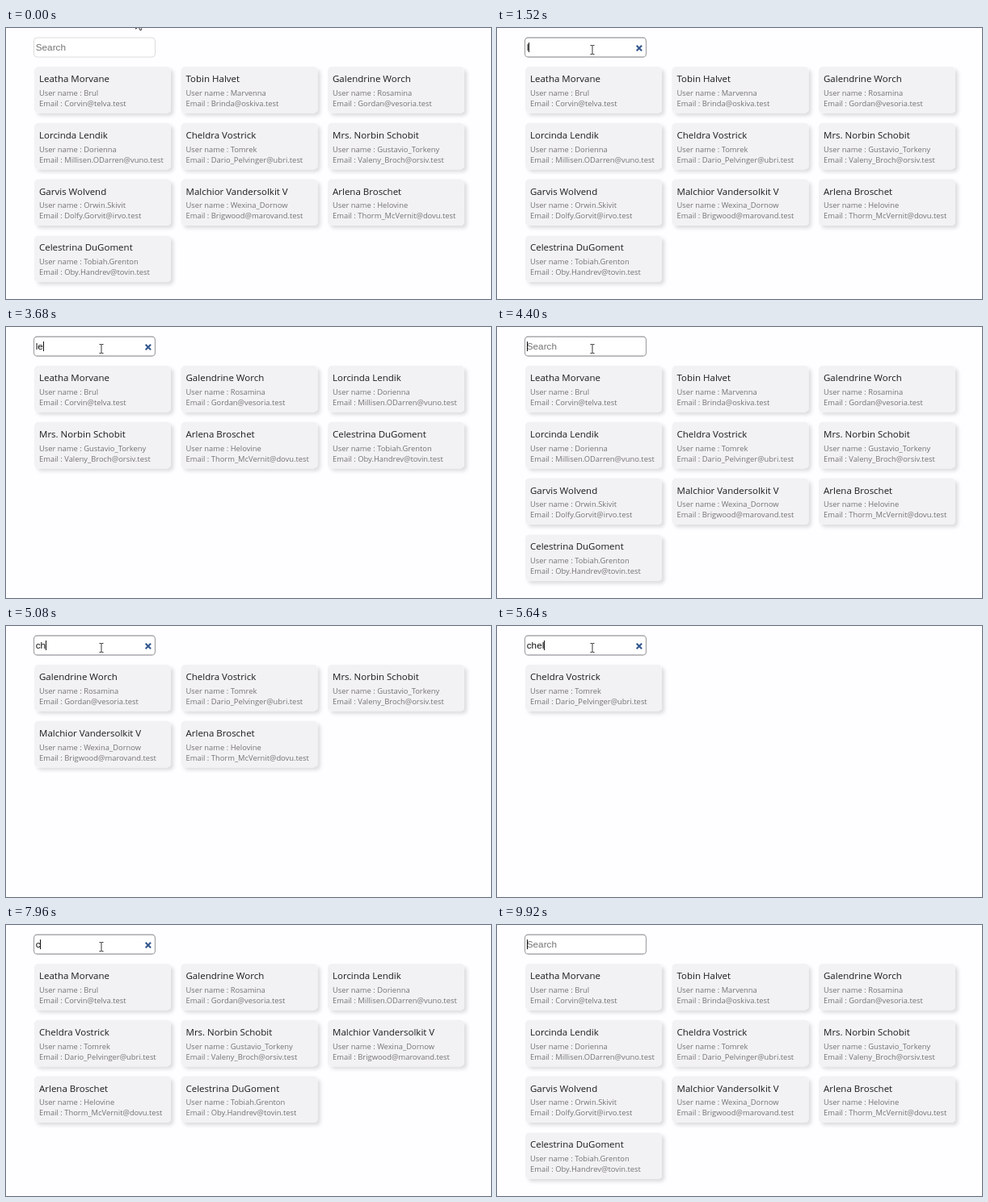
Animation, 600 px wide and 336 px high, one loop 10 s. Source, as an HTML page:

```html
<!DOCTYPE html>
<html lang="en">
<head>
<meta charset="utf-8">
<title>User search</title>
<style>
  html, body { margin: 0; width: 100%; height: 100%; overflow: hidden; background: #fefdff; }
  svg { display: block; width: 100%; height: 100%; }
  .card rect { fill: #f2f1f3; filter: url(#shadow); }
  .card text { font: 9.4px "Open Sans", "Noto Sans", sans-serif; fill: #747276; }
  .card .name { font-size: 11.5px; fill: #1c1b1e; }
  .field text { font: 11.8px "Liberation Sans", Arial, sans-serif; }
</style>
</head>
<body>
<svg id="stage" viewBox="0 0 600 336" xmlns="http://www.w3.org/2000/svg">
  <defs>
    <filter id="shadow" x="-10%" y="-20%" width="120%" height="150%">
      <feDropShadow dx="3.4" dy="3.4" stdDeviation="1.9" flood-color="#000" flood-opacity=".13"/>
    </filter>
  </defs>
  <g class="field">
    <rect id="box" x="34.5" y="12" width="150" height="24" rx="4" fill="#fff"/>
    <text id="hint" x="36.7" y="27.8" fill="#757575">Search</text>
    <text id="typed" x="36.7" y="27.8" fill="#111"></text>
    <path id="caret" d="M0 18V30" stroke="#111" stroke-width="1"/>
    <path id="clear" d="M172.7 21.8l6.4 6.4m0-6.4l-6.4 6.4" stroke="#34588f" stroke-width="2.1"/>
  </g>
  <g id="cards"></g>
  <path id="arrow" d="M0 0V13.6L3.2 10.6L5.3 15.2L7.3 14.4L5.2 9.8H9.6Z" fill="#fff" stroke="#222" stroke-width=".9"/>
  <path id="beam" d="M-2.5-5.5H-.7L0-5L.7-5.5H2.5M0-5V5M-2.5 5.5H-.7L0 5L.7 5.5H2.5" fill="none" stroke="#222" stroke-width=".9"/>
</svg>
<script>
const LOOP = 10000;
const FOCUS_AT = 640;

const users = [
  ["Leatha Morvane", "Brul", "Corvin@telva.test"],
  ["Tobin Halvet", "Marvenna", "Brinda@oskiva.test"],
  ["Galendrine Worch", "Rosamina", "Gordan@vesoria.test"],
  ["Lorcinda Lendik", "Dorienna", "Millisen.ODarren@vuno.test"],
  ["Cheldra Vostrick", "Tomrek", "Dario_Pelvinger@ubri.test"],
  ["Mrs. Norbin Schobit", "Gustavio_Torkeny", "Valeny_Broch@orsiv.test"],
  ["Garvis Wolvend", "Orwin.Skivit", "Dolfy.Gorvit@irvo.test"],
  ["Malchior Vandersolkit V", "Wexina_Dornow", "Brigwood@marovand.test"],
  ["Arlena Broschet", "Helovine", "Thorm_McVernit@dovu.test"],
  ["Celestrina DuGoment", "Tobiah.Grenton", "Oby.Handrev@tovin.test"]
];

// Each entry: time, contents of the search field
const typing = [
  [0, ""], [1520, "l"], [1880, "le"], [2280, "lea"],
  [3480, "le"], [3800, "l"], [4120, ""],
  [4840, "c"], [5080, "ch"], [5320, "che"], [5640, "chel"],
  [7040, "che"], [7480, "ch"], [7960, "c"], [8840, ""]
];

const caretOn = [
  [640, 1160], [1520, 2800], [3480, 3880], [4400, 6160],
  [6680, 7200], [7760, 8320], [8800, 9320], [9920, LOOP]
];

const $ = id => document.getElementById(id);
const show = (node, on) => node.setAttribute("display", on ? "inline" : "none");
const move = (node, x, y) => node.setAttribute("transform", `translate(${x} ${y})`);
const lerp = (a, b, p) => a + (b - a) * p;

function add(parent, tag, attrs, text = "") {
  const node = document.createElementNS("http://www.w3.org/2000/svg", tag);
  for (const key in attrs) node.setAttribute(key, attrs[key]);
  node.textContent = text;
  return parent.appendChild(node);
}

const cards = users.map(([name, user, email]) => {
  const node = add($("cards"), "g", { class: "card" });
  add(node, "rect", { width: 169, height: 57.5, rx: 5 });
  add(node, "text", { x: 6, y: 19, class: "name" }, name);
  add(node, "text", { x: 6, y: 35.8 }, `User name : ${user}`);
  add(node, "text", { x: 6, y: 48.8 }, `Email : ${email}`);
  return { node, key: `${name} ${email}`.toLowerCase() };
});

function layCards(query) {
  let slot = 0;
  for (const { node, key } of cards) {
    const match = key.includes(query);
    show(node, match);
    if (!match) continue;
    move(node, 35 + slot % 3 * 181.5, 48 + Math.floor(slot / 3) * 69.8);
    slot++;
  }
}

function pointerAt(t) {
  if (t < 9480) {
    const p = Math.min(1, Math.max(0, t / 600));
    const eased = p * p * (3 - 2 * p);
    return [lerp(160.6, 118, eased), lerp(-12.4, 27, eased)];
  }
  const p = (t - 9480) / 120;
  return [lerp(118, 640, p), lerp(27, -20, p)];
}

function drawPointer(t) {
  const [x, y] = pointerAt(t);
  const inField = x > 34 && x < 185 && y > 11 && y < 37;
  const visible = t < 9600;
  show($("arrow"), visible && !inField);
  show($("beam"), visible && inField);
  move($("arrow"), x, y);
  move($("beam"), x, y);
}

let shownQuery = null;

function draw(t) {
  const query = typing.filter(([at]) => at <= t).pop()[1];
  if (query !== shownQuery) {
    shownQuery = query;
    $("typed").textContent = query;
    show($("hint"), !query);
    show($("clear"), query);
    layCards(query);
    const width = query ? $("typed").getComputedTextLength() : 0;
    move($("caret"), Math.floor(37 + width) + 0.5, 0);
  }
  const focused = t >= FOCUS_AT;
  $("box").setAttribute("stroke", focused ? "#a9a8ac" : "#d9d8db");
  $("box").setAttribute("stroke-width", focused ? 1.3 : 0.9);
  show($("caret"), caretOn.some(([from, to]) => t >= from && t < to));
  drawPointer(t);
}

function tick() {
  draw(performance.now() % LOOP);
  requestAnimationFrame(tick);
}
tick();
</script>
</body>
</html>
```
